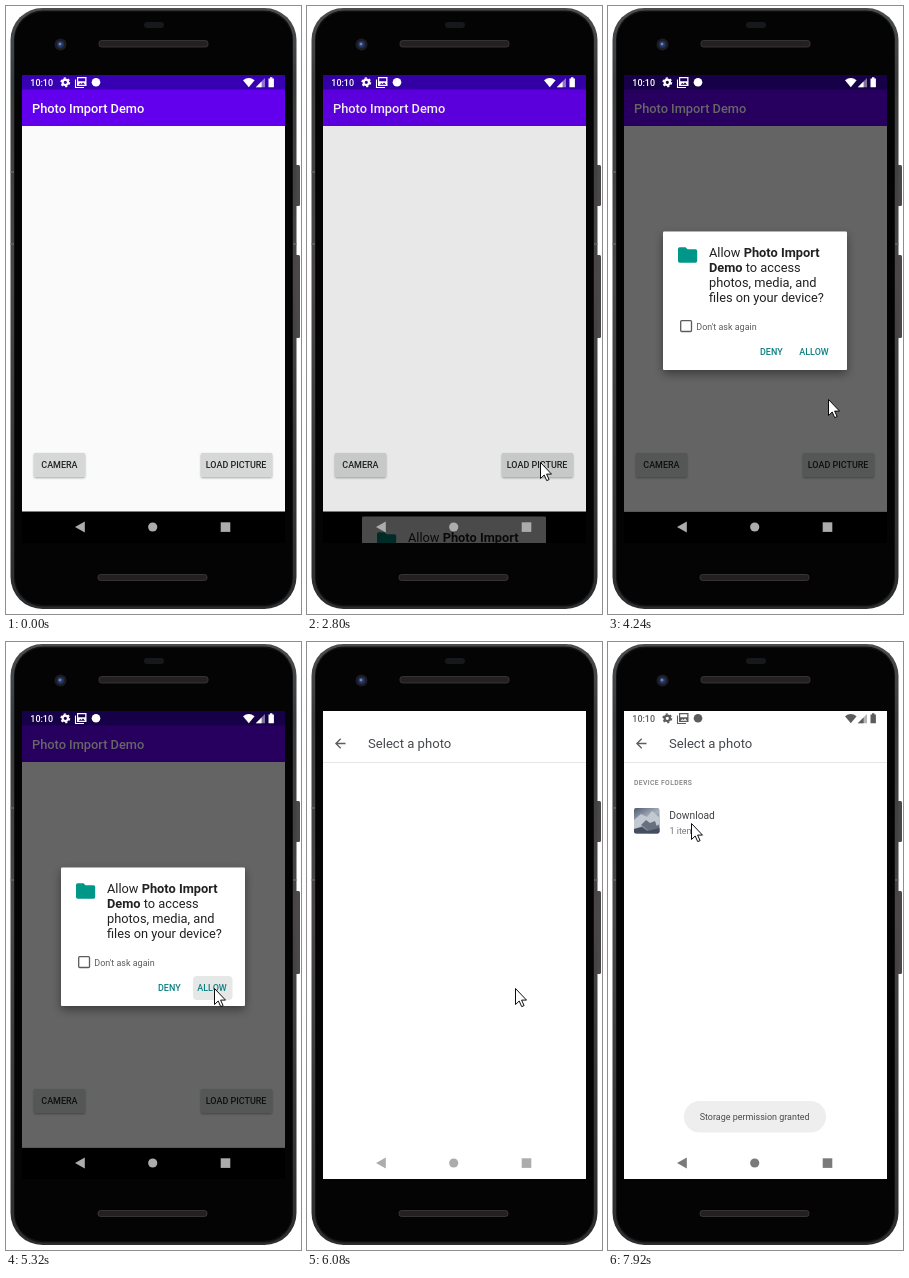
An HTML page for the animation above (8 s loop, 295 px wide and 608 px high).

```html
<!DOCTYPE html>
<html lang="en">
<head>
<meta charset="utf-8">
<title>Photo import demo</title>
<style>
html, body { margin: 0; width: 100%; height: 100%; overflow: hidden; background: #fff; }
svg { display: block; width: 295px; height: 608px; font-family: Roboto, "Noto Sans", sans-serif; }
text { white-space: pre; }
.s { font-size: 8.96px; }
.l { font-size: 12.8px; }
.m { font-weight: 500; }
</style>
</head>
<body>
<svg viewBox="0 0 295 608">
  <defs>
    <linearGradient id="rim" x2="0" y2="1">
      <stop offset="0" stop-color="#4a4c4e"/><stop offset=".12" stop-color="#3a3c3e"/>
      <stop offset=".45" stop-color="#4a4646"/><stop offset="1" stop-color="#2c2d2f"/>
    </linearGradient>
    <linearGradient id="sky" x2=".6" y2="1">
      <stop offset="0" stop-color="#4d5a70"/><stop offset=".5" stop-color="#a9b2bd"/><stop offset="1" stop-color="#5b6472"/>
    </linearGradient>
    <filter id="soft" x="-20%" y="-20%" width="140%" height="150%">
      <feDropShadow dx="0" dy="1" stdDeviation=".9" flood-opacity=".35"/>
    </filter>
    <filter id="deep" x="-20%" y="-20%" width="140%" height="150%">
      <feDropShadow dx="0" dy="4" stdDeviation="5" flood-opacity=".4"/>
    </filter>
    <clipPath id="screen"><rect x="16" y="69" width="263" height="468"/></clipPath>
    <clipPath id="load"><rect x="195" y="447" width="71" height="24" rx="1.3"/></clipPath>
    <clipPath id="reveal"><rect id="revealBox" x="16" y="69" width="263" height="468"/></clipPath>
    <clipPath id="thumb"><rect x="26" y="166" width="25.5" height="25.5" rx="2"/></clipPath>
  </defs>

  <!-- phone -->
  <g fill="#4b4849">
    <rect x="288" y="159" width="6" height="41" rx="1.5"/>
    <rect x="288" y="249" width="6" height="83" rx="1.5"/>
  </g>
  <rect x="4.5" y="2" width="286" height="601" rx="32" fill="url(#rim)"/>
  <rect x="8" y="4.5" width="279" height="596" rx="29" fill="#101112"/>
  <rect x="9" y="6" width="277" height="593" rx="28" fill="#040404"/>
  <path d="M4 166h4M4 238h4M287 238h4" stroke="#77777a"/>
  <rect x="138" y="16" width="20" height="6" rx="3" fill="#17181b"/>
  <g fill="#232021" stroke="#423c3b" stroke-width=".8">
    <rect x="93" y="34.5" width="109" height="6.5" rx="2.5"/>
    <rect x="92" y="568.5" width="109" height="6" rx="2.5"/>
  </g>
  <circle cx="54.5" cy="38.5" r="6" fill="#1c1d24"/>
  <circle cx="54.5" cy="38.5" r="3.4" fill="#25335f"/>
  <circle cx="54" cy="38" r="1.5" fill="#6a83c0"/>

  <g clip-path="url(#screen)">
    <rect x="16" y="69" width="263" height="468"/>
    <!-- app -->
    <rect x="16" y="119" width="263" height="386.5" fill="#fafafa"/>
    <rect x="16" y="83" width="263" height="37" fill="#6200ee"/>
    <rect x="16" y="69" width="263" height="14.5" fill="#3700b3"/>
    <text class="l m" x="26" y="106.5" fill="#fff">Photo Import Demo</text>
    <g fill="#d6d7d7" filter="url(#soft)">
      <rect x="28" y="447" width="51" height="24" rx="1.3"/>
      <rect x="195" y="447" width="71" height="24" rx="1.3"/>
    </g>
    <circle id="ripple" cx="233" cy="456" clip-path="url(#load)"/>
    <g class="s m" fill="#222">
      <text x="35.3" y="462">CAMERA</text>
      <text x="199.8" y="462">LOAD PICTURE</text>
    </g>
    <rect id="dim" x="16" y="69" width="263" height="436.5"/>

    <!-- picker -->
    <g clip-path="url(#reveal)"><g id="picker">
      <rect x="16" y="69" width="263" height="500" fill="#fff"/>
      <path d="M16 120.5h263" stroke="#e6e6e6"/>
      <path d="M38.5 101.5h-9.5m4.7-4.8l-4.8 4.8 4.8 4.8" fill="none" stroke="#5a5d61" stroke-width="1.3"/>
      <text x="61" y="106" font-size="13.1" fill="#45484c">Select a photo</text>
      <g id="list">
        <text class="m" x="26" y="142.5" font-size="6.8" letter-spacing=".35" fill="#7a7d81">DEVICE FOLDERS</text>
        <g clip-path="url(#thumb)">
          <rect x="26" y="166" width="26" height="26" fill="url(#sky)"/>
          <path d="M26 178l7-6 6 3 5-6 8 7v6l-8 4-7-3-11 4z" fill="#c3c9d0"/>
          <path d="M33 183l5-5 4 3 5-2 2 6-8 3z" fill="#66707f"/>
          <path d="M26 187l8-2 5 4 13-3v6H26z" fill="#434e60"/>
        </g>
        <text x="61.3" y="177" font-size="10.24" fill="#3f4246">Download</text>
        <text class="s" x="61.5" y="192" fill="#75787c">1 item</text>
      </g>
    </g></g>
    <g id="toast">
      <rect x="76" y="459" width="142" height="31.5" rx="15.7" fill="#eee"/>
      <text class="s" x="91.7" y="478" fill="#4a4a4a">Storage permission granted</text>
    </g>

    <!-- permission dialog -->
    <g id="dialog">
      <rect x="55" y="225.5" width="184" height="138.5" rx="1.3" fill="#fff" filter="url(#deep)"/>
      <path d="M70 243a1.7 1.7 0 0 1 1.7-1.7h5.8l2 2h8a1.7 1.7 0 0 1 1.7 1.7v10a1.7 1.7 0 0 1-1.7 1.7H71.7a1.7 1.7 0 0 1-1.7-1.7z" fill="#009688"/>
      <g class="l" fill="#212121">
        <text x="101" y="250.7">Allow <tspan font-weight="700">Photo Import</tspan></text>
        <text x="101" y="265.8"><tspan font-weight="700">Demo</tspan> to access</text>
        <text x="101" y="280.9">photos, media, and</text>
        <text x="101" y="296">files on your device?</text>
      </g>
      <rect x="72.7" y="314.7" width="10.8" height="10.8" rx="1" fill="none" stroke="#5c5c5c" stroke-width="1.3"/>
      <text class="s" x="88.3" y="323.8" fill="#5c5c5c">Don't ask again</text>
      <rect id="press" x="187" y="334" width="39.5" height="24" rx="4" fill="#e6e8e8"/>
      <g class="s m" fill="#0b7f80">
        <text x="152" y="349.3">DENY</text>
        <text x="191.3" y="349.3">ALLOW</text>
      </g>
    </g>

    <!-- system bars -->
    <g id="status" fill="currentColor">
      <text class="s m" x="24.3" y="79.8">10:10</text>
      <circle cx="59.3" cy="76.3" r="2.7" fill="none" stroke="currentColor" stroke-width="2.2"/>
      <circle cx="59.3" cy="76.3" r="4.2" fill="none" stroke="currentColor" stroke-width="1.5" stroke-dasharray="2.2"/>
      <path d="M69.5 73.5v8h8.5" fill="none" stroke="currentColor" stroke-width="1.1"/>
      <path fill-rule="evenodd" d="M71 71h9.5v9H71zM72.2 72.3v3h7v-3zM72.5 78.8h6.6l-2-2.4-1.6 1.6-1.2-1z"/>
      <circle cx="90" cy="76.3" r="4.3"/>
      <path d="M237 74.2q5.8-4.6 11.6 0l-5.8 7z"/>
      <path d="M259 72v9.2h-9.2z" opacity=".45"/>
      <path d="M255.6 75.4v5.8h-5.8z"/>
      <path d="M262.5 72.4h1.5v-1.2h2.4v1.2h1.5v8.8h-5.4z"/>
    </g>
    <g id="nav" fill="currentColor">
      <path d="M69 521l9.8-5.6v11.2z"/>
      <circle cx="146.7" cy="521" r="4.6"/>
      <rect x="214.7" y="516.3" width="9.6" height="9.6"/>
    </g>
  </g>

  <g id="cursor">
    <circle id="click" r="12" fill="#ff0" opacity=".47"/>
    <path d="M.5.5v16l3.7-3.5 2.5 5.6 2.4-1-2.5-5.5h4.9z" fill="#fff" stroke="#000" stroke-width=".95"/>
  </g>
</svg>
<script>
const LOOP = 8000;
const el = {};
document.querySelectorAll('[id]').forEach(e => el[e.id] = e);

const step = (t, a, b, n) =>
  t < a ? 0 : t >= b ? 1 : (1 + Math.floor((t - a) / (b - a) * (n - 1))) / n;
const smooth = p => p * p * (3 - 2 * p);
const mix = (a, b, p) => a + (b - a) * p;
const within = (t, a, b) => t >= a && t < b;
const set = (e, attrs) => { for (const k in attrs) e.setAttribute(k, attrs[k]); };
const show = (e, on) => set(e, { visibility: on ? 'visible' : 'hidden' });
const grey = v => `rgb(${v},${v},${v})`;

// start, end, steps, x, y
const moves = [
  [640, 1400, 8, 238, 450], [1520, 1520, 1, 237, 447], [1720, 1720, 1, 235, 449],
  [1920, 2137, 3, 233, 456], [3760, 3760, 1, 232, 440],
  [3920, 4640, 8, 208, 346], [6960, 7720, 8, 83, 181]
];
const clicks = [[2246, 2463], [5080, 5320], [7840, 7920]];

function drawCursor(t) {
  let x = 246, y = 606;
  for (const [a, b, n, toX, toY] of moves) {
    const p = smooth(step(t, a, b, n));
    x = mix(x, toX, p);
    y = mix(y, toY, p);
  }
  x = Math.round(x);
  y = Math.round(y);
  set(el.cursor, { transform: `translate(${x} ${y})`, display: t < 640 ? 'none' : 'inline' });
  set(el.click, { display: clicks.some(([a, b]) => within(t, a, b)) ? 'inline' : 'none' });
}

function drawDialog(t) {
  const i = step(t, 2800, 3120, 4) * 4;
  const closing = t >= 5400;
  const alpha = t >= 5520 ? 0 : closing ? .3 : [0, .29, .8, 1, 1][i];
  const dim = t >= 5640 ? 0 : t >= 5520 ? .008 : closing ? .25 : [0, .07, .3, .5, .6][i];
  set(el.dialog, { opacity: alpha, transform: `translate(0 ${[300, 285, 70, 12, 0][i]})` });
  set(el.dim, { opacity: dim });
  set(el.press, { opacity: t >= 5320 ? 1 : 0 });
}

function drawPicker(t) {
  const p = 1 - (1 - step(t, 5640, 6080, 5)) ** 3;
  const q = step(t, 6160, 6400, 3);
  show(el.picker, p > 0);
  set(el.revealBox, { y: mix(537, 69, p) });
  set(el.picker, { transform: `translate(0 ${mix(19, 0, p)})` });
  set(el.list, { opacity: q });
  set(el.toast, { opacity: q });
  set(el.status, { color: grey(mix(255, 92, q)) });
  set(el.nav, { color: grey(mix(172, 122, q)) });
}

function draw(now) {
  const t = now % LOOP;
  const r = step(t, 2354, 2720, 4);
  set(el.ripple, { r: r * 70, opacity: r < 1 ? .14 * (1 - r * r * .5) : 0 });
  drawDialog(t);
  drawPicker(t);
  drawCursor(t);
}

const start = performance.now();
function frame() {
  draw(performance.now() - start);
  requestAnimationFrame(frame);
}
frame();
</script>
</body>
</html>
```
